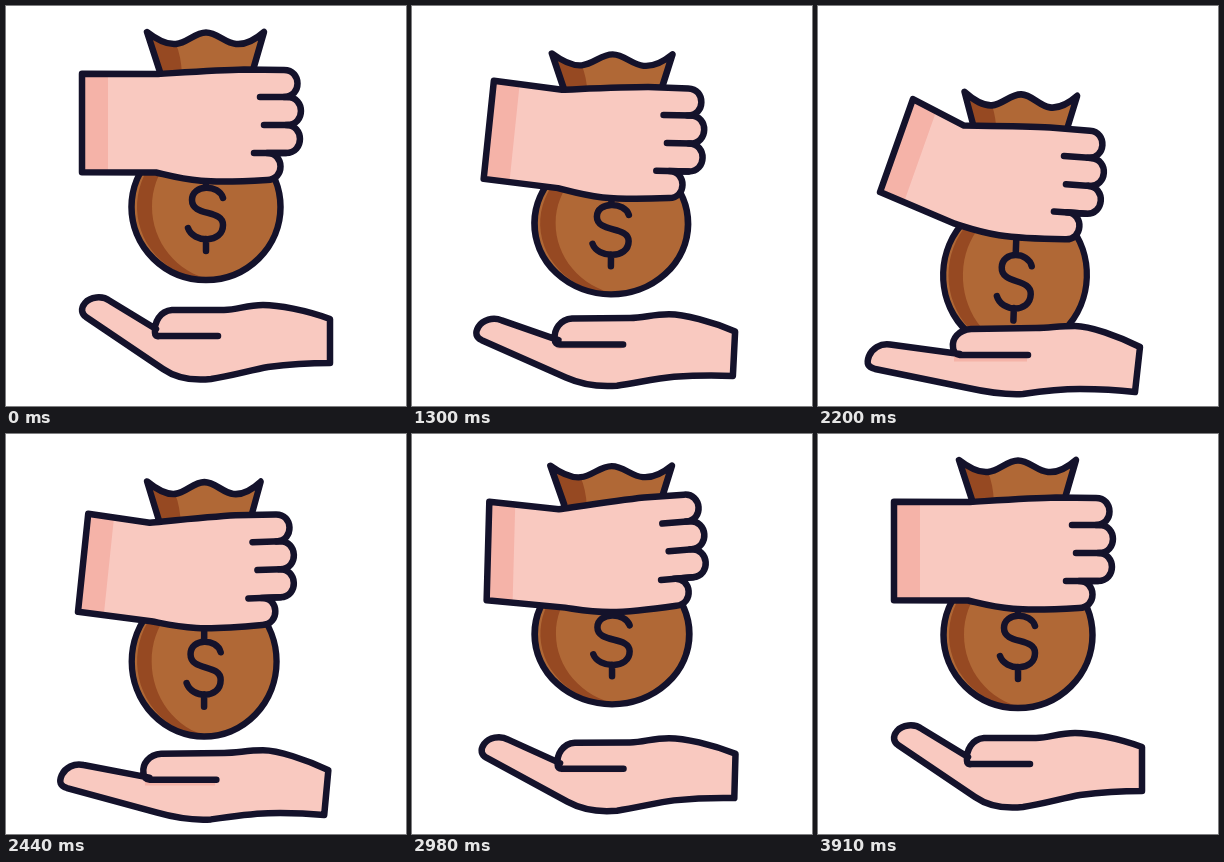
Write an HTML page that moves like this. It is 400x400 px and loops after 3940 ms.

```html
<!DOCTYPE html>
<html lang="en">
<head>
<meta charset="utf-8">
<title>Money bag handover</title>
<style>
  html, body { margin: 0; width: 100%; height: 100%; overflow: hidden; background: #fff; }
  svg { display: block; width: 100vw; height: 100vh; }
  .line { fill: none; stroke: #14122b; stroke-width: 6.5; stroke-linecap: round; stroke-linejoin: round; vector-effect: non-scaling-stroke; }
  .skin { fill: #f9c9c0; }
  .blush { fill: #f5b3a8; }
  .bag { fill: #b06836; }
  .dark { fill: #964922; }
</style>
</head>
<body>
<svg viewBox="0 0 400 400">
  <defs>
    <clipPath id="armClip"><path id="armClipPath"/></clipPath>
    <path id="neck" d="M141 26C150 33 160 39 170 38C181 37 189 26.5 200 26.5C211 26.5 219 37 230 38C240 39 250 33 258 26L247 64L240 130L160 130L154 66Z"/>
    <ellipse id="belly" cx="200" cy="201" rx="74.5" ry="73"/>
  </defs>

  <g id="bag">
    <use href="#neck" class="bag"/>
    <path class="dark" d="M141 26C150 33 160 39 170 38Q175 50 176 68L180 130L160 130L154 66Z"/>
    <use href="#neck" class="line"/>
    <use href="#belly" class="bag"/>
    <path class="dark" d="M200 128A74.5 73 0 0 0 206 273.8C170 267 146 235 146 201C146 165 170 140 200 128Z"/>
    <use href="#belly" class="line"/>
    <path class="line" d="M217 192C213 178 186 178 186 194C186 211 217 203 217 219C217 238 187 237 182 222M200 233L200 245M200 168L200 181"/>
  </g>

  <g>
    <path id="palmFill" class="skin"/>
    <path id="palmShade" stroke="#f5b3a8" stroke-width="6"/>
    <path id="palmLine" class="line"/>
  </g>

  <g>
    <path id="armFill" class="skin"/>
    <g clip-path="url(#armClip)"><rect id="cuff" class="blush" x="-20" y="-80" width="46" height="160"/></g>
    <path id="armLine" class="line"/>
    <path id="creases" class="line"/>
  </g>
</svg>

<script>
const LOOP = 3940;
const PRESS = 1030, LIFT = 2200, TOP = 2710;
const $ = id => document.getElementById(id);

// Three poses per part: x, y, angle.
const fistPoses = { rest: [254, 91, 0], low: [246, 150, 4.2], high: [247, 59, -9.2] };
const wristPoses = { rest: [76, 117, 0], low: [78.5, 139.5, 19.5], high: [75.5, 116, -10] };
const bagPoses = { rest: [200, 201, 0], low: [197, 269, 2], high: [199.5, 178.5, -2.2] };

// The receiving hand, cupped and pressed flat.
const cupped = 'M150 323L104 295C96 289 84 291 79 297C74 303 76 308 80 311L157 363C170 372 186 375 205 373C225 370 245 364 262 361C285 358 300 357 324 357L324 313C300 304 272 299 257 299C240 299 232 304 218 304L166 304C154 305 148 316 149 327Q149 331 153 330L212 330';
const flat = 'M142 348L72 338.5C62 337 54 343 51 350C48 358 50 361 57 363L150 382C168 386 186 389 205 388C225 385 245 383 262 383C285 383 300 384 317 386L322 341C300 330 272 320 257 320C240 320 232 322 218 322L153 323C140 324 134 333 135 341Q135 348 142 349L210 349';
const flatNums = flat.match(/[\d.]+/g);

// Drawn at rest, with the first crease at 254, 91.
const fistPath = '152 68C185 66 215 64 238 63.5L278 64C296 64 296 91 278 91L281 91C299.6 91 299.6 119 281 119L280 119C298.6 119 298.6 147 280 147L261 147C279 147 279 174 261 174C235 175.5 210 176 195 174.8C175 173 165 170 150 166.5';
const creasePath = 'M254 91L282 91M258 119L282 119M248 147L280 147';

const lerp = (a, b, k) => a + (b - a) * k;
const span = (t, from, to) => Math.min(1, Math.max(0, (t - from) / (to - from)));

// Smooth step; a skew below 1 makes it start faster.
function ease(t, from, to, skew = 1) {
  const u = span(t, from, to) ** skew;
  return u * u * (3 - 2 * u);
}
const easeOut = (t, from, to) => 1 - (1 - span(t, from, to)) ** 2;
const hump = (t, from, to) => Math.sin(Math.PI * span(t, from, to));

// Go from rest to low, to high and back to rest.
const move = ({ rest, low, high }, press, lift, back) =>
  rest.map((v, i) => lerp(lerp(lerp(v, low[i], press), high[i], lift), v, back));

// Place a point given relative to a turned origin.
function place(px, py, [x, y, angle]) {
  const r = angle * Math.PI / 180, c = Math.cos(r), s = Math.sin(r);
  return `${(x + px * c - py * s).toFixed(2)} ${(y + px * s + py * c).toFixed(2)}`;
}

const turnPath = (d, pose) =>
  d.replace(/([\d.]+) ([\d.]+)/g, (_, x, y) => place(x - 254, y - 91, pose));

function drawPalm(k) {
  let n = 0;
  const d = cupped.replace(/[\d.]+/g, a => lerp(+a, +flatNums[n++], k).toFixed(2));
  $('palmFill').setAttribute('d', d);
  $('palmLine').setAttribute('d', d);
  const y = lerp(330, 352.5, k);
  $('palmShade').setAttribute('d', `M${lerp(153, 136, k)} ${y}L${lerp(210, 209, k)} ${y}`);
}

function drawArm(fist, wrist) {
  const d = `M${place(0, -49.3, wrist)}L${turnPath(fistPath, fist)}L${place(0, 49.3, wrist)}Z`;
  for (const id of ['armFill', 'armLine', 'armClipPath']) $(id).setAttribute('d', d);
  $('creases').setAttribute('d', turnPath(creasePath, fist));
  const [x, y, angle] = wrist;
  $('cuff').setAttribute('transform', `translate(${x} ${y}) rotate(${angle})`);
}

function drawBag([x, y, angle], squash) {
  $('bag').setAttribute('transform',
    `translate(${x} ${y}) rotate(${angle}) scale(${1 + squash} ${1 - squash}) translate(-200 -201)`);
}

function draw(t) {
  const press = ease(t, PRESS, 1980, .8);
  const sink = ease(t, PRESS, 2150, .8);
  const lift = ease(t, LIFT, TOP);
  const drop = ease(t, TOP, 3020);
  const settle = ease(t, TOP, 3350, .85);
  const recoil = hump(t, 2620, 3400);

  const [x, , angle] = move(fistPoses, press, lift, settle);
  const [, y] = move(fistPoses, press, lift, drop);
  const wrist = move(wristPoses, press, lift, drop);
  wrist[2] += 2 * recoil;

  const squash = .038 * (hump(t, PRESS, 1940) - hump(t, 1940, 2620) + recoil);
  drawBag(move(bagPoses, sink, lift, drop), squash);
  drawPalm(easeOut(t, PRESS, 2090) - ease(t, LIFT, 3470, .8));
  drawArm([x, y, angle], wrist);
}

const start = performance.now();
function frame() {
  draw((performance.now() - start) % LOOP);
  requestAnimationFrame(frame);
}
frame();
</script>
</body>
</html>
```
